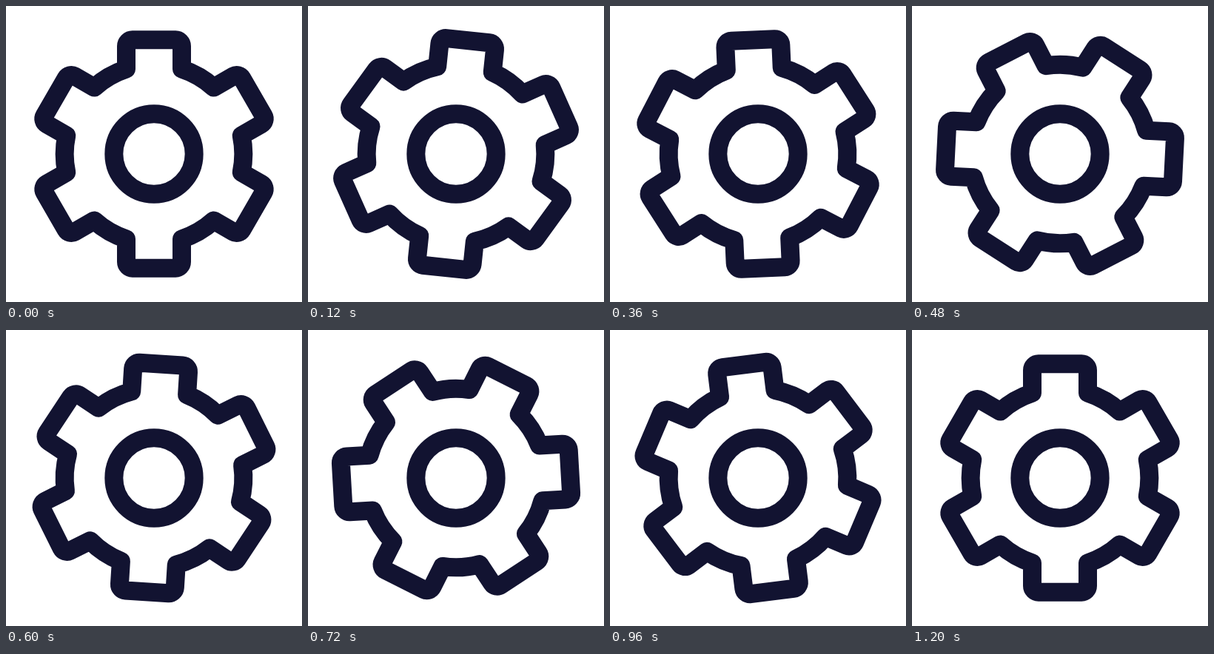
Animation, 400 px wide and 400 px high, one loop 3.23 s. Source, as an HTML page:

```html
<!DOCTYPE html>
<html lang="en">
<head>
<meta charset="utf-8">
<title>Turning gear</title>
<style>
  html, body { margin: 0; width: 100%; height: 100%; overflow: hidden; background: #fff; }
  svg { display: block; width: 100%; height: 100%; }
</style>
</head>
<body>
<svg viewBox="-200 -200 400 400">
  <g fill="none" stroke="#121331" stroke-width="25" stroke-linejoin="round">
    <path id="gear"/>
    <circle r="54.17"/>
  </g>
</svg>
<script>
const LOOP = 3230, TURN = 1200, STEP = 30;
const TEETH = 6, HALF = 37.5, TIP = 154.17, RING = 120.83, ROUND = 8.33;
const gear = document.getElementById('gear');

function gearPath() {
  const base = Math.sqrt(RING * RING - HALF * HALF);
  let d = '';
  for (let i = 0; i < TEETH; i++) {
    const a = i * 2 * Math.PI / TEETH, c = Math.cos(a), s = Math.sin(a);
    const at = (x, y) => `${(x * c - y * s).toFixed(3)} ${(x * s + y * c).toFixed(3)}`;
    const arc = (r, x, y) => `A${r} ${r} 0 0 1 ${at(x, y)}`;
    d += i ? arc(RING, -HALF, -base) : 'M' + at(-HALF, -base);
    d += 'L' + at(-HALF, ROUND - TIP) + arc(ROUND, ROUND - HALF, -TIP);
    d += 'L' + at(HALF - ROUND, -TIP) + arc(ROUND, HALF, ROUND - TIP);
    d += 'L' + at(HALF, -base);
  }
  return d + `A${RING} ${RING} 0 0 1 ${-HALF} ${-base}Z`;
}

// Cubic bezier easing (0.333, 0, 0.378, 1), solved by bisection
function ease(x) {
  if (x <= 0 || x >= 1) return x <= 0 ? 0 : 1;
  let lo = 0, hi = 1;
  for (let i = 0; i < 30; i++) {
    const s = (lo + hi) / 2, q = 1 - s;
    if (3 * q * q * s * 0.333 + 3 * q * s * s * 0.378 + s * s * s < x) lo = s;
    else hi = s;
  }
  return lo * lo * (3 - 2 * lo);
}

function draw(ms) {
  const t = Math.floor((ms % LOOP) / STEP) * STEP;
  gear.setAttribute('transform', `rotate(${180 * ease(t / TURN)})`);
}

gear.setAttribute('d', gearPath());
draw(0);
const start = performance.now();
function tick() {
  draw(performance.now() - start);
  requestAnimationFrame(tick);
}
requestAnimationFrame(tick);
</script>
</body>
</html>
```
